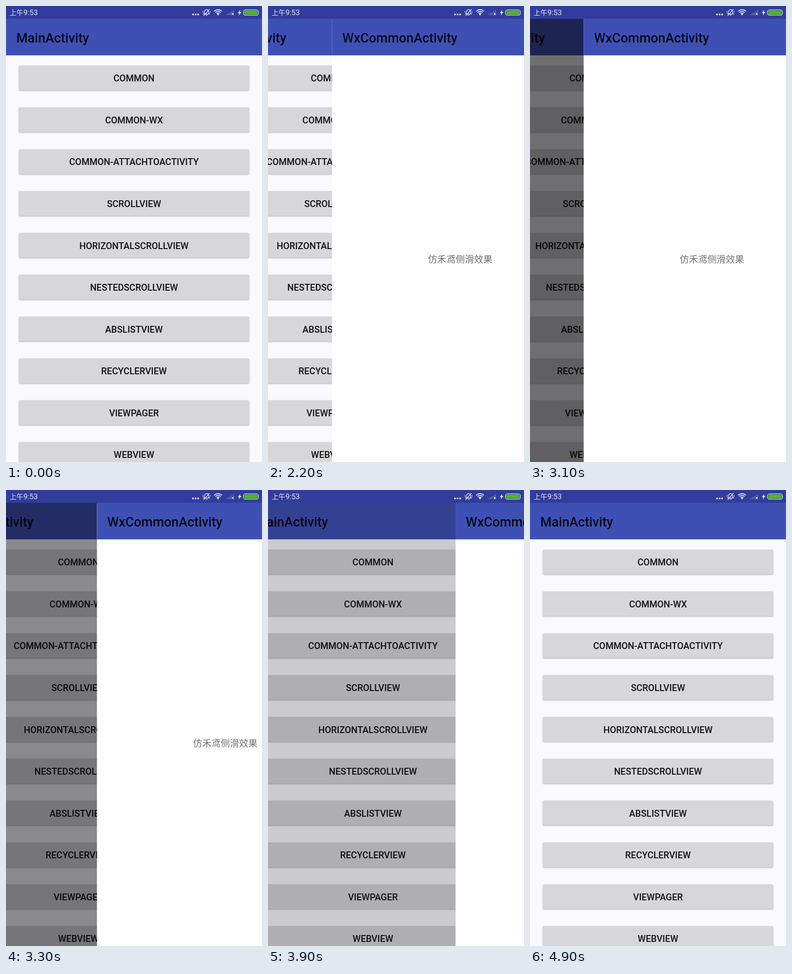
An HTML page with a canvas that plays this animation: 561x998 px, repeating every 5 s.

```html
<!DOCTYPE html>
<html lang="zh">
<head>
<meta charset="utf-8">
<title>Swipe back</title>
<style>
html, body { margin: 0; width: 100%; height: 100%; overflow: hidden; background: #faf9fd; }
canvas { display: block; width: 561px; height: 998px; }
</style>
</head>
<body>
<canvas id="stage"></canvas>
<script>
const W = 561, H = 998, LOOP = 5000, STEP = 100;
const STATUS_H = 28, BAR_BOTTOM = 108;
const PARALLAX = 0.337, MAX_DIM = 0.7;
const ROBOTO = 'Roboto, sans-serif';
const CJK = '"Noto Sans CJK SC", "Noto Sans CJK", sans-serif';
const LABELS = ['COMMON', 'COMMON-WX', 'COMMON-ATTACHTOACTIVITY', 'SCROLLVIEW',
  'HORIZONTALSCROLLVIEW', 'NESTEDSCROLLVIEW', 'ABSLISTVIEW', 'RECYCLERVIEW',
  'VIEWPAGER', 'WEBVIEW'];
// Left edge of the upper page while it is dragged: [ms, px]
const DRAG = [[2700, 0], [2800, 1], [2900, 36], [3300, 199.5], [3900, 411],
  [4300, 552], [4400, 558], [4500, W]];

const canvas = document.getElementById('stage');
const ctx = canvas.getContext('2d');
const dpr = window.devicePixelRatio || 1;
canvas.width = W * dpr;
canvas.height = H * dpr;

function rect(x, y, w, h, color) {
  ctx.fillStyle = color;
  ctx.fillRect(x, y, w, h);
}

function roundRect(x, y, w, h, r) {
  ctx.beginPath();
  ctx.roundRect(x, y, w, h, r);
}

function text(str, x, y, font, color, align = 'left') {
  ctx.font = font;
  ctx.fillStyle = color;
  ctx.textAlign = align;
  ctx.fillText(str, x, y);
}

function polygon(points) {
  ctx.beginPath();
  points.forEach(([x, y]) => ctx.lineTo(x, y));
  ctx.closePath();
  ctx.fill();
}

function line(x1, y1, x2, y2) {
  ctx.beginPath();
  ctx.moveTo(x1, y1);
  ctx.lineTo(x2, y2);
  ctx.stroke();
}

function appBar(title) {
  rect(0, STATUS_H, W, BAR_BOTTOM - STATUS_H, '#3f50b5');
  text(title, 22.6, 80, '500 28.57px ' + ROBOTO, '#08091a');
}

function button(label, top) {
  ctx.save();
  ctx.shadowColor = 'rgba(0,0,0,.27)';
  ctx.shadowBlur = 3 * dpr;
  ctx.shadowOffsetY = 1.5 * dpr;
  ctx.fillStyle = '#d7d6d9';
  roundRect(28, top, 505, 54, 3);
  ctx.fill();
  ctx.restore();
  text(label, 280.5, top + 35, '500 20px ' + ROBOTO, '#121214', 'center');
}

function mainPage() {
  rect(0, STATUS_H, W, H - STATUS_H, '#faf9fd');
  appBar('MainActivity');
  LABELS.forEach((label, i) => button(label, 130.3 + i * 91.55));
}

function wxPage() {
  rect(0, STATUS_H, W, H - STATUS_H, '#fefefe');
  appBar('WxCommonActivity');
  text('仿禾鸢侧滑效果', 281, 561.5, '20.2px ' + CJK, '#737373', 'center');
}

function bell() {
  ctx.lineWidth = 1.4;
  ctx.beginPath();
  ctx.moveTo(433.5, 17.5);
  ctx.quadraticCurveTo(435.3, 16, 435.3, 12.5);
  ctx.bezierCurveTo(435.3, 6.5, 443.7, 6.5, 443.7, 12.5);
  ctx.quadraticCurveTo(443.7, 16, 445.5, 17.5);
  ctx.closePath();
  ctx.stroke();
  line(437.5, 20, 441.5, 20);
  line(433, 21.5, 446, 7);
  ctx.lineWidth = 1.1;
  line(432, 10.5, 432, 15.5);
  line(447, 10.5, 447, 15.5);
}

function wifi() {
  ctx.lineWidth = 2;
  for (const r of [4.5, 8.3, 12]) {
    ctx.beginPath();
    ctx.arc(464.7, 20, r, -Math.PI * 0.75, -Math.PI * 0.25);
    ctx.stroke();
  }
  ctx.beginPath();
  ctx.arc(464.7, 18.6, 1.8, 0, 7);
  ctx.fill();
}

function signal() {
  for (let i = 0; i < 5; i++) {
    const h = 2.4 + i * 2;
    rect(483 + i * 3.6, 20 - h, 2.2, h, 'rgba(225,228,245,.3)');
  }
  rect(493, 13.5, 7.5, 7, '#313c9d');
  ctx.lineWidth = 1.3;
  line(494.5, 15, 499.3, 19.8);
  line(499.3, 15, 494.5, 19.8);
}

function battery() {
  ctx.lineWidth = 1.3;
  roundRect(520.3, 8.3, 33, 11.8, 4.5);
  ctx.stroke();
  ctx.fillStyle = '#4abc0d';
  roundRect(522, 10, 29.6, 8.4, 3);
  ctx.fill();
}

function statusBar() {
  const ink = '#e1e4f5';
  rect(0, 0, W, STATUS_H, '#313c9d');
  text('上午', 8, 20.3, '15px ' + CJK, ink);
  text('9:53', 38.3, 20.3, '16.2px ' + ROBOTO, ink);
  ctx.strokeStyle = ink;
  for (const x of [409.8, 415.5, 421.2]) {
    ctx.beginPath();
    ctx.arc(x, 18.5, 2, 0, 7);
    ctx.fill();
  }
  bell();
  wifi();
  signal();
  ctx.fillStyle = ink;
  polygon([[513.5, 8], [508, 15.6], [511.3, 15.6], [510, 21], [516, 13], [512.4, 13]]);
  battery();
}

function dragX(t) {
  const i = DRAG.findIndex(p => p[0] > t);
  if (i < 0) return W;
  const [t0, x0] = DRAG[i - 1], [t1, x1] = DRAG[i];
  return x0 + (x1 - x0) * (t - t0) / (t1 - t0);
}

function wxLeft(t) {
  if (t < 2000) return W;
  if (t < 2400) return W * (1 - (t - 2000) / 400) ** 2;
  return t < 2700 ? 0 : dragX(t);
}

function draw(t) {
  const x = wxLeft(t);
  const cover = 1 - x / W;
  ctx.setTransform(dpr, 0, 0, dpr, 0, 0);

  ctx.save();
  ctx.translate(-cover * W * PARALLAX, 0);
  mainPage();
  ctx.restore();

  if (t >= 2400) rect(0, STATUS_H, x, H - STATUS_H, `rgba(0,0,0,${cover * MAX_DIM})`);

  if (x < W) {
    ctx.save();
    ctx.translate(x, 0);
    wxPage();
    ctx.restore();
  }
  statusBar();
}

const start = performance.now();
function tick() {
  const t = (performance.now() - start) % LOOP;
  draw(Math.floor(t / STEP) * STEP);
  requestAnimationFrame(tick);
}
tick();
</script>
</body>
</html>
```
